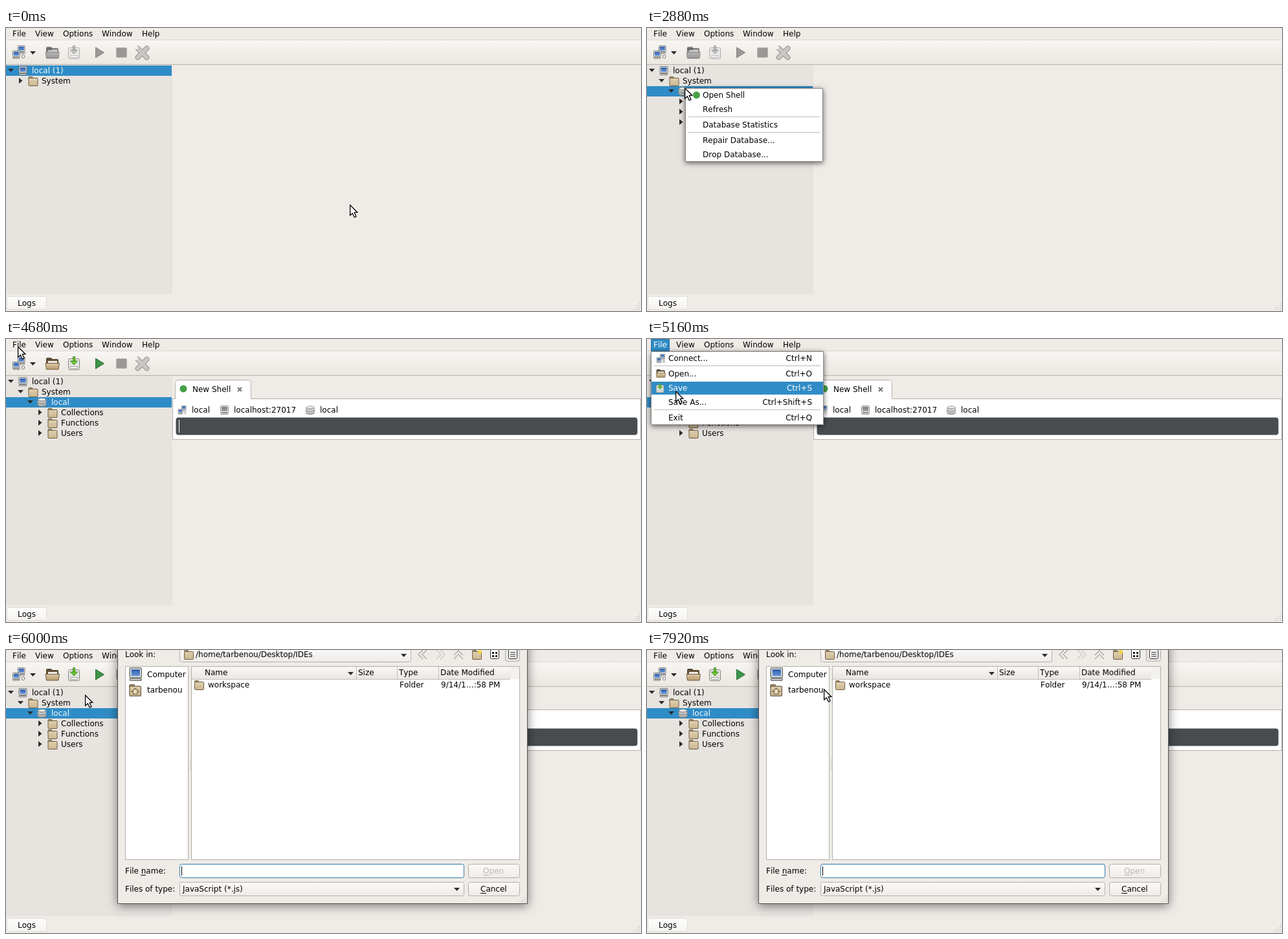
Write an HTML page with a canvas that moves like this. It is 981 px wide and 438 px high and loops after 8000 ms.

```html
<!DOCTYPE html>
<html lang="en">
<head>
<meta charset="utf-8">
<style>
  html, body { margin: 0; width: 100%; height: 100%; overflow: hidden; background: #efebe7; }
  canvas { display: block; }
</style>
</head>
<body>
<canvas id="stage" width="981" height="438"></canvas>
<script>
const ctx = document.getElementById('stage').getContext('2d');
const LOOP = 8000, STEP = 120, GLIDE = 360, BLINK = 480;
const BG = '#efebe7', BLUE = '#308cc6', INK = '#000', EDGE = '#b3afab', LEAF = '#46a045';
const USER = 'tarbenou';

// Moments at which the interface changes
const SYSTEM_OPENS = 1200, LOCAL_OPENS = 2040, LOCAL_PICKED = 2760, SHELL_MENU = 2880, SHELL_HOVER = 3360,
  SHELL_MENU_ENDS = 3600, SHELL = 3720, FILE_HOVER = 4800, FILE_MENU = 4920, FILE_MENU_ENDS = 5760, DIALOG = 5880;

// Pointer stops: arrival time, x, y; each is reached by an eased glide
const stops = [
  [0, 531, 273], [120, 73, 57], [600, 5, 77], [960, 20, 80], [1440, 41, 88], [1800, 40, 99], [2520, 58, 92],
  [3600, 96, 103], [4680, 18, 11], [5160, 44, 80], [5520, 48, 51], [6240, 335, 121], [6720, 273, 60],
  [7080, 349, 118], [7920, 273, 60]
];
function pointerAt(t) {
  const next = stops.findIndex(s => s[0] >= t);
  if (next <= 0) return stops.at(next).slice(1);
  const [t0, x0, y0] = stops[next - 1], [t1, x1, y1] = stops[next];
  const k = Math.max(0, 1 - (t1 - t) / Math.min(GLIDE, t1 - t0));
  const ease = k * k * (3 - 2 * k);
  return [Math.round(x0 + (x1 - x0) * ease), Math.round(y0 + (y1 - y0) * ease)];
}

function paint(fill, stroke) {
  if (fill) { ctx.fillStyle = fill; ctx.fill(); }
  if (stroke) { ctx.strokeStyle = stroke; ctx.stroke(); }
}
function box(x, y, w, h, fill, stroke, r = 0) {
  const o = stroke ? .5 : 0;
  ctx.beginPath();
  ctx.roundRect(x + o, y + o, w - 2 * o, h - 2 * o, r);
  paint(fill, stroke);
}
function poly(fill, stroke, ...p) {
  ctx.beginPath();
  for (let i = 0; i < p.length; i += 2) ctx.lineTo(p[i], p[i + 1]);
  ctx.closePath();
  paint(fill, stroke);
}
function oval(x, y, rx, ry, fill, stroke, end = 7) {
  ctx.beginPath();
  ctx.ellipse(x, y, rx, ry, 0, 0, end);
  paint(fill, stroke);
}
const dot = (x, y, r, fill) => oval(x, y, r, r, fill);
function cross(x, y, r, width, color) {
  ctx.lineWidth = width;
  ctx.strokeStyle = color;
  ctx.beginPath();
  for (const s of [-r, r]) { ctx.moveTo(x - r, y + s); ctx.lineTo(x + r, y - s); }
  ctx.stroke();
}
// Returns the width of the text
function text(s, x, y, color = INK) {
  ctx.font = '12px "DejaVu Sans", sans-serif';
  ctx.fontKerning = 'none';
  ctx.fillStyle = color;
  ctx.fillText(s, x, y);
  return ctx.measureText(s).width;
}
function shade(y0, y1, a, b) {
  const g = ctx.createLinearGradient(0, y0, 0, y1);
  g.addColorStop(0, a);
  g.addColorStop(1, b);
  return g;
}
function at(x, y, draw, scale = 1, filter = 'none') {
  ctx.save();
  ctx.translate(x, y);
  ctx.scale(scale, scale);
  ctx.filter = filter;
  draw();
  ctx.restore();
}
function shadowed(blur, dy, color, draw) {
  ctx.save();
  Object.assign(ctx, { shadowBlur: blur, shadowOffsetY: dy, shadowColor: color });
  draw();
  ctx.restore();
}

const GREY = 'grayscale(1) opacity(.6)';
const arrowDown = (x, y) => poly('#2b2b2b', null, x, y, x + 9, y, x + 4.5, y + 5);
const arrowRight = (x, y) => poly('#2b2b2b', null, x, y, x + 5.5, y + 4.5, x, y + 9);

function folder() {
  box(1, 0, 7, 5, '#b39a72', '#6e5d44', 1);
  box(1, 2, 15, 13, shade(3, 14, '#dfcfae', '#cbb791'), '#6e5d44', 1);
}
function home() {
  folder();
  poly('#e9dcc2', '#80704f', 4, 9, 8.5, 5, 13, 9, 11, 9, 11, 12, 6, 12, 6, 9);
}
function monitor() {
  box(1, 0, 13, 11, '#f3f2ee', '#6c6c68', 1);
  box(3, 2, 9, 7, shade(2, 9, '#2d5aa8', '#6b98d8'));
  box(1, 11, 13, 3, '#deddd8', '#777', 1);
}
function database() {
  box(0, 1, 14, 13, shade(1, 14, '#dcdedd', '#a9acaa'), '#8b8e8c', 4);
  for (let y = 3; y < 12; y += 4) oval(7, y, 6.5, 2.2, null, '#7d807e', Math.PI);
  oval(7, 2.8, 6, 2, '#eceeed', '#999c9a');
}
function network() {
  at(8, 0, monitor, .9);
  at(0, 8, monitor, .9);
  box(15, 14, 5, 6, '#eee', '#777', 1);
}
function openFolder() {
  box(1, 0, 9, 6, '#69563c', '#4c3d29', 1);
  box(1, 2, 19, 16, '#69563c', '#4c3d29', 1);
  box(4, 5, 14, 4, '#f1eee8');
  poly(shade(8, 18, '#dfcba6', '#b69a6d'), '#6e5d44', 1.5, 18, 0, 8.5, 21.5, 8.5, 20, 18);
}
function saveIcon() {
  box(0, 3, 18, 18, '#e4e4e0', '#858581', 2);
  box(3, 15, 12, 4, '#fafafa', '#a0a09c');
  box(7, 0, 4, 8, '#6fc736', '#3f8f1c');
  poly('#6fc736', '#3f8f1c', 3.5, 7, 14.5, 7, 9, 13);
}
function tools() {
  ctx.lineCap = 'round';
  cross(11.5, 11.5, 7, 8, '#959390');
  cross(11.5, 11.5, 7, 6, '#c9c7c3');
  dot(2, 3, 3, '#f3f0ec');
}
function grip(x, y) {
  for (let i = 0; i < 4; i++)
    for (let j = 0; j <= i; j++) box(x - j * 3, y - (3 - i) * 3, 1, 1, '#aaa6a2');
}

function chrome(shell, fileActive) {
  box(0, 0, 981, 438, BG);
  box(0, 18, 981, 1, '#dad6d1');
  box(0, 19, 981, 37, shade(19, 56, '#f8f6f3', '#ebe7e1'));
  box(0, 56, 981, 1, '#b6b2ae');
  if (fileActive) box(6, 0, 29, 19, BLUE, '#2473a8');
  let x = 10;
  for (const s of ['File', 'View', 'Options', 'Window', 'Help'])
    x += Math.round(text(s, x, 13, fileActive && s === 'File' ? '#fff' : INK)) + 14;

  const state = shell ? 'none' : GREY;
  at(9, 27, network);
  arrowDown(37, 36);
  at(61, 29, openFolder, 1, state);
  at(96, 27, saveIcon, 1, state);
  poly(shell ? '#3c9448' : '#9b9996', shell ? '#2a6d35' : '#858380', 138.5, 30, 151.5, 38, 138.5, 46);
  box(170, 30, 17, 16, '#9b9996', '#b9b6b2', 1);
  at(199, 27, tools);

  box(0, 57, 257, 355, '#e7e4e0');
  box(1, 415, 62, 21, shade(415, 436, '#fdfdfc', '#f5f3f1'), '#dfdbd7', 3);
  text('Logs', 18, 430);
  grip(978, 435);
}

function tree(t) {
  const systemOpen = t >= SYSTEM_OPENS, localOpen = t >= LOCAL_OPENS;
  const selected = t >= LOCAL_PICKED ? 2 : 0;
  const rows = [['local (1)', 0, monitor, true], ['System', 1, folder, systemOpen]];
  if (systemOpen) rows.push(['local', 2, database, localOpen]);
  if (localOpen) for (const s of ['Collections', 'Functions', 'Users']) rows.push([s, 3, folder]);
  rows.forEach(([label, depth, icon, open], i) => {
    const x = depth * 15, y = 58 + i * 16;
    if (i === selected) box(0, y, 256, 16, BLUE);
    open ? arrowDown(x + 3, y + 5) : arrowRight(x + 5, y + 3);
    at(x + 18.5, y + 1, icon);
    text(label, x + 40, y + 12, i === selected ? '#f2f8fc' : INK);
  });
}

function shellTab(caret) {
  box(257, 92, 724, 64, '#fff', EDGE);
  box(261, 63, 118, 40, '#fff', EDGE, 5);
  box(258, 93, 722, 62, '#fff');
  dot(274, 77, 5.5, LEAF);
  text('New Shell', 288, 82);
  cross(361, 78, 3, 2, '#777472');
  ctx.lineWidth = 1;
  let x = 265;
  for (const [label, icon, scale] of [['local', network, .66], ['localhost:27017', monitor, 1], ['local', database, 1]]) {
    at(x, 103, icon, scale, 'grayscale(1) opacity(.8)');
    x += Math.round(text(label, x + 22, 114)) + 37;
  }
  box(262.5, 121.5, 713, 27, '#484c4f', null, 4);
  if (caret) box(267, 125, 1, 20, '#fff');
}

// Items are [label, shortcut, icon]; null is a separator
function menu(x, y, w, items, pointer) {
  const h = items.reduce((sum, item) => sum + (item ? 22 : 2), 0);
  shadowed(8, 2, 'rgba(0,0,0,.6)', () => box(x, y, w, h, '#fff'));
  box(x, y, w, h, '#fff', '#8f8c89');
  for (const item of items) {
    if (!item) {
      box(x + 5, y, w - 10, 1, '#bdbab7');
      y += 2;
      continue;
    }
    const [label, key, icon] = item;
    const hover = pointer && pointer[1] > y && pointer[1] <= y + 22;
    const color = hover ? '#fff' : INK;
    if (hover) box(x + 1, y + 1, w - 2, 20, BLUE);
    if (icon) at(x + 8, y + 4, icon, .68);
    text(label, x + 27, y + 15, color);
    if (key) text(key, x + w - 18 - ctx.measureText(key).width, y + 15, color);
    y += 22;
  }
}
const shellMenu = [
  ['Open Shell', '', () => dot(14, 10, 8, LEAF)], ['Refresh'], null,
  ['Database Statistics'], null, ['Repair Database...'], ['Drop Database...']
];
const fileMenu = [
  ['Connect...', 'Ctrl+N', network], null, ['Open...', 'Ctrl+O', openFolder],
  ['Save', 'Ctrl+S', saveIcon], ['Save As...', 'Ctrl+Shift+S'], null, ['Exit', 'Ctrl+Q']
];

function button(x, y, w, label, color = INK) {
  box(x, y, w, 22, shade(y, y + 22, '#fbfaf9', '#eeebe7'), EDGE, 3);
  if (!label) return arrowDown(x + w - 16, y + 9);
  const left = Math.round(x + (w - ctx.measureText(label).width) / 2 - .5);
  text(label, left, y + 15, color);
  box(left, y + 17, 9, 1, color);
}
// Dotted double chevron, turned by quarter steps
function chevrons(x, y, turn, color) {
  at(x, y, () => {
    ctx.rotate(turn * Math.PI / 2);
    for (const s of [-6, 0])
      for (let i = -3; i <= 3; i++) box(s + Math.abs(i) * 2 - .8, i * 2 - .8, 1.6, 1.6, color);
  });
}

function dialog(caret) {
  shadowed(15, 3, 'rgba(0,0,0,.5)', () => box(172, -30, 634, 423, BG));
  box(172, -30, 634, 423, BG, '#55524f');
  text('Look in:', 184, 11);
  button(268, -3, 358);
  at(274, 0, folder);
  text(`/home/${USER}/Desktop/IDEs`, 293, 11);
  chevrons(643, 7, 0, '#858380');
  chevrons(672, 7, 2, '#b9b6b2');
  chevrons(699, 7, 1, '#858380');
  at(719, 0, folder);
  dot(732, 3, 3, '#f2d648');
  box(771, -4, 23, 22, '#e8e5e1', EDGE, 3);
  for (const x of [748, 776]) box(x, -1, 14, 15, '#fff', '#333', 2);
  for (let y = 3; y < 12; y += 3) box(779, y, 8, 1, '#222');
  for (const x of [751, 756]) for (const y of [3, 8]) box(x, y, 3, 3, '#222');

  box(184, 25, 98, 300, '#fff', EDGE);
  at(189, 27, monitor, 1.5);
  text('Computer', 218, 42);
  at(189, 53, home, 1.25);
  text(USER, 218, 66);
  for (let y = 168; y < 186; y += 3) box(284, y, 1, 1, '#a19d99');

  box(286, 25, 508, 300, '#fff', EDGE);
  box(287, 26, 506, 19, '#f3f1ee');
  box(287, 26, 492, 19, shade(26, 45, '#f9f8f6', '#e9e6e2'));
  box(287, 45, 492, 1, '#c3bfbb');
  arrowDown(528, 34);
  at(290, 47, folder);
  const columns = [[304, 'Name', 'workspace'], [541, 'Size', ''], [604, 'Type', 'Folder'], [668, 'Date Modified', '9/14/1…:58 PM']];
  columns.forEach(([x, head, cell], i) => {
    if (i) box(x, 26, 1, 19, '#c3bfbb');
    text(head, x + 3, 39);
    text(cell, x + (i ? 4 : 8), 58);
  });

  text('File name:', 184, 346);
  box(208, 348, 8, 1, INK);
  box(268, 331, 440, 22, '#fff', '#3079a8', 3);
  if (caret) box(271, 335, 1, 14, INK);
  button(714, 331, 80, 'Open', '#bab7b3');
  text('Files of type:', 184, 374);
  button(268, 359, 440);
  text('JavaScript (*.js)', 273, 374);
  button(714, 359, 80, 'Cancel');
  grip(803, 389);
}

function drawPointer([x, y]) {
  ctx.lineWidth = 1.3;
  at(x + .6, y + 1, () =>
    poly('#fff', '#000', 0, 0, 0, 16, 3.7, 12.7, 6.6, 19, 9.4, 17.8, 6.6, 11.6, 11.2, 11.2));
}

function render(t) {
  const pointer = pointerAt(t), shell = t >= SHELL;
  const during = (from, to) => t >= from && t < to;
  const blink = from => Math.floor((t - from) / BLINK) % 2 === 0;
  ctx.lineWidth = 1;
  chrome(shell, during(FILE_HOVER, DIALOG));
  tree(t);
  if (shell) shellTab(t < FILE_MENU && blink(SHELL));
  if (during(SHELL_MENU, SHELL_MENU_ENDS)) menu(59, 93, 213, shellMenu, t >= SHELL_HOVER && pointer);
  if (during(FILE_MENU, FILE_MENU_ENDS)) menu(6, 19, 267, fileMenu, pointer);
  if (t >= DIALOG) dialog(blink(DIALOG));
  drawPointer(pointer);
}

const start = performance.now();
function tick() {
  const t = (performance.now() - start) % LOOP;
  render(Math.floor(t / STEP) * STEP);
  requestAnimationFrame(tick);
}
tick();
</script>
</body>
</html>
```
